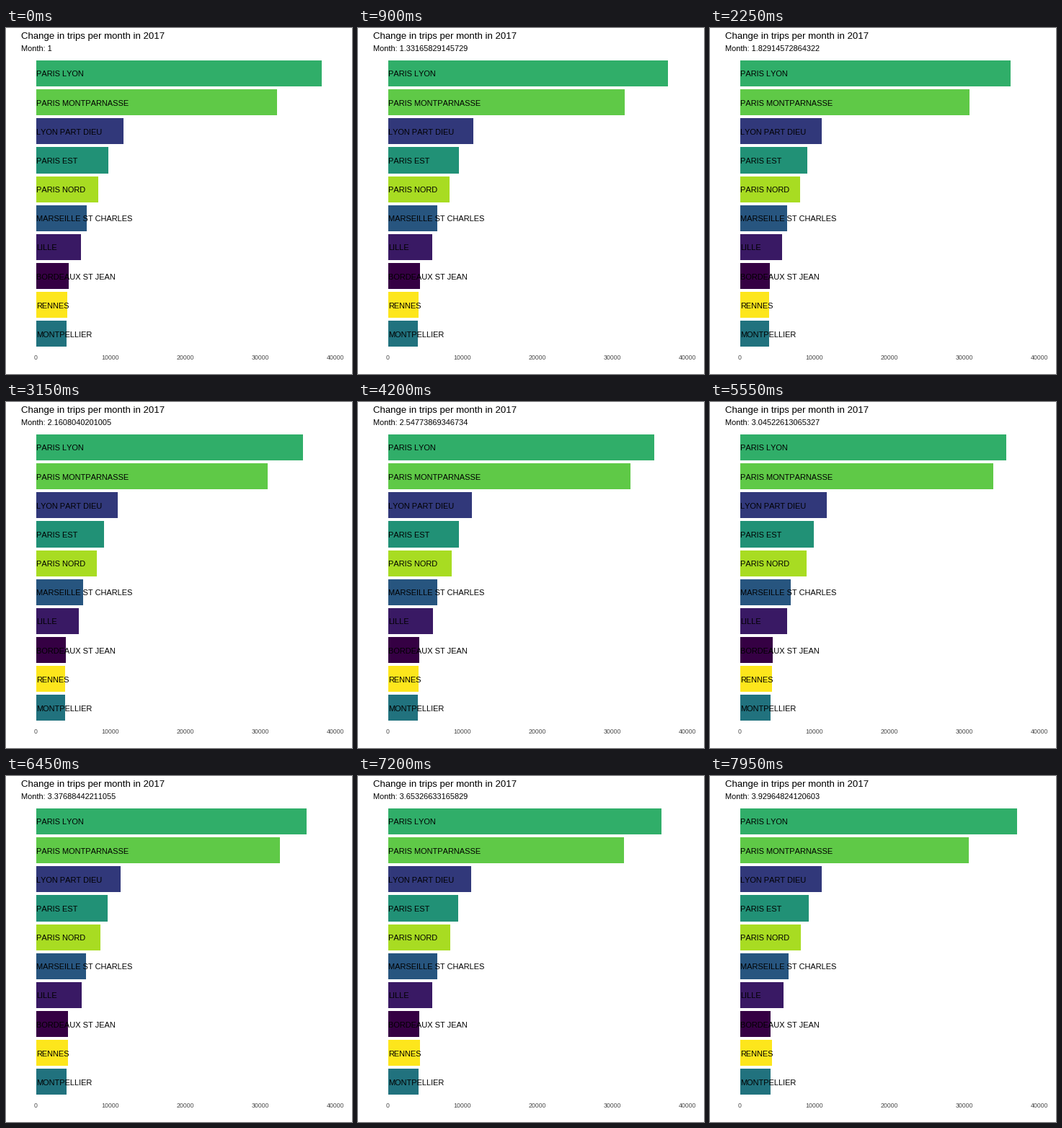
A matplotlib script for the animation above (8 s loop, 480 by 480 pixels).

```python
import numpy as np
import matplotlib.pyplot as plt
from matplotlib.animation import FuncAnimation
from matplotlib.patches import Rectangle

plt.rcParams["font.family"] = "Liberation Sans"
plt.rcParams["text.kerning_factor"] = 6  # effectively no kerning

SIZE, DPI = 480, 72
INTERVAL, FRAMES, HOLD = 50, 160, 3
MONTHS = [1, 2, 3, 4]
LEFT, TOP, PITCH, HEIGHT = 42, 45, 40.15, 36.1

# station, colour, right edge of the bar (px) at each month
STATIONS = [
    ("PARIS LYON", "#30ae69", (438.2, 412.6, 410.3, 427.3)),
    ("PARIS MONTPARNASSE", "#5fc947", (376.1, 356.9, 394.7, 355.9)),
    ("LYON PART DIEU", "#31387a", (163.1, 153.5, 162.3, 154.1)),
    ("PARIS EST", "#219176", (142.3, 134.0, 144.4, 136.0)),
    ("PARIS NORD", "#a8dc22", (128.2, 124.5, 134.5, 125.2)),
    ("MARSEILLE ST CHARLES", "#27557f", (112.2, 106.0, 112.5, 108.4)),
    ("LILLE", "#391964", (104.2, 99.3, 107.3, 101.2)),
    ("BORDEAUX ST JEAN", "#350043", (87.2, 82.3, 87.3, 83.6)),
    ("RENNES", "#fde61c", (85.2, 81.6, 86.1, 86.0)),
    ("MONTPELLIER", "#21727e", (84.2, 81.6, 84.2, 84.0)),
]

fig = plt.figure(figsize=(SIZE / DPI, SIZE / DPI), dpi=DPI, facecolor="white")
ax = fig.add_axes([0, 0, 1, 1])
ax.set(xlim=(0, SIZE), ylim=(SIZE, 0))
ax.axis("off")


def write(x, y, text, size=11, color="black", ha="left"):
    return ax.text(x, y, text, size=size, color=color, ha=ha, va="baseline", zorder=3)


write(21, 15, "Change in trips per month in 2017", size=13.2)
subtitle = write(21, 32, "")

bars = []
for i, (name, color, _) in enumerate(STATIONS):
    bar = Rectangle((LEFT, TOP + PITCH * i), 0, HEIGHT, facecolor=color, linewidth=0)
    bars.append(ax.add_patch(bar))
    write(LEFT, int(67.97 + PITCH * i), name)

for i in range(5):
    write(40.8 + 104.1 * i, 460, str(10000 * i), size=8.8, color="#4d4d4d", ha="center")


def update(frame):
    month = 1 + (frame // HOLD) * 11 / 199
    subtitle.set_text(f"Month: {month:.15g}")
    for bar, (_, _, edges) in zip(bars, STATIONS):
        bar.set_width(np.interp(month, MONTHS, edges) - LEFT)
    return [subtitle, *bars]


anim = FuncAnimation(fig, update, frames=FRAMES, interval=INTERVAL,
                     repeat=True, repeat_delay=0, blit=False)
plt.show()
```
